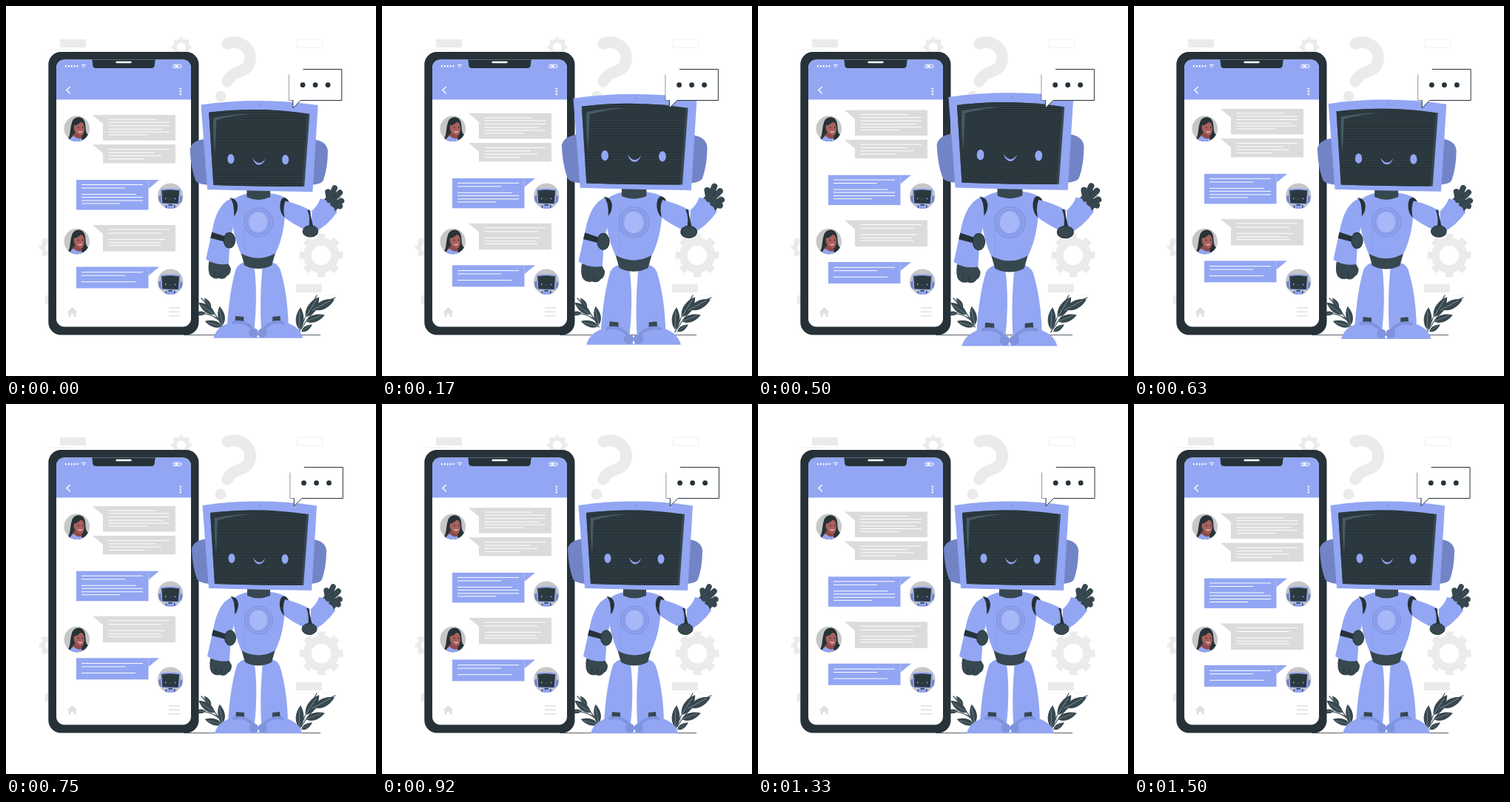
Write an HTML page that moves like this. It is 500x500 px and loops after 1.54 s.

```html
<!DOCTYPE html>
<html lang="en">
<head>
<meta charset="utf-8">
<title>Chat bot</title>
<style>
  html, body { margin: 0; height: 100%; overflow: hidden; background: #fff; }
  svg { display: block; width: 100%; height: 100%; }
  .blue { fill: #92a6f3; }
  .shade { fill: #7284c6; }
  .dark { fill: #263238; }
  .slate { fill: #37474f; }
  .pale { fill: #ebebeb; }
  .line { fill: none; stroke-linecap: round; stroke-linejoin: round; }
</style>
</head>
<body>
<svg viewBox="0 0 500 500">
  <defs>
    <clipPath id="disc"><circle r="17.3"/></clipPath>
    <clipPath id="screen"><rect x="68" y="72.5" width="182" height="361" rx="11"/></clipPath>
    <pattern id="scan" width="4" height="2.6" patternUnits="userSpaceOnUse">
      <rect width="4" height="2.6" fill="#263238"/><rect width="4" height=".8" fill="#35444b"/>
    </pattern>

    <g id="gear" fill="none" stroke="#ebebeb">
      <circle r="18.7" stroke-width="11"/>
      <circle r="26" stroke-width="7" pathLength="16" stroke-dasharray="1 1" stroke-dashoffset=".5"/>
    </g>

    <g id="leaf">
      <path class="slate" d="M0 0C7-6 7-17 1-27C-6-18-6-6 0 0Z"/>
      <path class="line" d="M0 2V-22" stroke="#90a0a6" stroke-width=".6"/>
    </g>

    <g id="girl" clip-path="url(#disc)">
      <circle r="18" fill="#c7c7c7"/>
      <path class="dark" d="M-7-7C-5-18 9-18 11-8C13 0 10 6 18 10V18H-16C-7 12-10 1-7-7Z"/>
      <path d="M-7 10Q0 4-1 0H7V12L0 18Z" fill="#8f4a48"/>
      <path d="M-4-4Q2-5 5-9Q9-9 10-3Q11 6 7 9Q-1 9-4 1Z" fill="#a9605a"/>
      <path class="blue" d="M-10 18Q-9 11-4 10Q1 15 6 13L9 18Z"/>
      <path class="line" d="M2 4Q4 6 7 4" stroke="#fff" stroke-width=".9"/>
      <path class="line" d="M2-2V-1M8-2V-1" stroke="#263238" stroke-width="1.3"/>
    </g>

    <g id="bot">
      <path class="shade" d="M272 182Q253 184 251 196Q252 220 258 236Q260 242 276 243ZM416 183Q432 186 433 198Q433 220 427 237Q425 242 411 243Z"/>
      <!-- legs and feet -->
      <path class="blue" d="M312 353Q317 345 326 345Q336 346 337 360Q340 395 336 432L300 430Q303 382 312 353ZM346 360Q346 346 356 345Q366 345 370 354Q380 386 381 430L345 432Q343 395 346 360Z"/>
      <path class="slate" d="M311 416L322 417V429H310ZM360 417L370 416L371 429H360Z"/>
      <path class="blue" d="M282 445Q286 430 303 425Q322 420 335 432L341 445ZM400 445Q396 430 379 425Q360 420 347 432L341 445Z"/>
      <path class="line" d="M308 425Q322 421 333 432M374 425Q360 421 349 432" stroke="#8093dd" stroke-width="4"/>
      <g fill="#8093dd"><circle cx="335" cy="438" r="6.2"/><circle cx="347" cy="438" r="6.2"/></g>
      <!-- torso -->
      <path class="slate" d="M317 328H365L359 349Q341 358 323 349Z"/>
      <path class="blue" d="M306 264Q318 253 341 253Q366 253 377 260Q378 305 364 333Q341 346 318 333Q304 302 306 264Z"/>
      <path class="slate" d="M326 249H357V259Q341 266 326 259Z"/>
      <path class="line" d="M323 270V331" stroke="#8396e2" stroke-width=".5"/>
      <circle cx="341.500" cy="292" r="19" fill="#8ea1ee" stroke="#7d90dc"/>
      <circle cx="341.500" cy="292" r="15.500" fill="none" stroke="#7d90dc" stroke-width=".8"/>
      <ellipse cx="341" cy="292" rx="12" ry="13.500" fill="#a7b7f7"/>
      <!-- left arm -->
      <path class="dark" d="M304 260Q313 261 314 270Q314 281 307 286Z"/>
      <path class="slate" d="M276 344Q274 358 278 363Q283 368 289 366Q296 369 300 363Q305 361 305 353L300 344Z"/>
      <path class="line" d="M284 358L283 363M291 359V365" stroke="#263238" stroke-width=".8"/>
      <path class="blue" d="M305 261Q286 269 280 305L272 341Q286 350 302 347L304 314Q312 288 308 268Z"/>
      <path d="M280 305L301 312V319L278 313Z" class="dark"/>
      <ellipse class="slate" cx="303" cy="316" rx="7.500" ry="10.200" stroke="#263238"/>
      <!-- right arm -->
      <ellipse class="dark" cx="377" cy="273" rx="7" ry="13.500" transform="rotate(-8 377 273)"/>
      <path class="blue" d="M377 264Q395 268 411 277L407 304Q386 294 376 286Q373 274 377 264Z"/>
      <path class="blue" d="M412 277Q420 270 423 261Q439 263 445 279Q432 298 411 308Z"/>
      <path class="dark" d="M406 276Q411 287 407 302L415 303Q411 287 409 276Z"/>
      <ellipse class="slate" cx="410" cy="304" rx="10" ry="7.500" stroke="#263238"/>
      <path class="line" d="M435 263L433 252M436 260L442 247M439 263L449 253M442 269L451 264M440 268L449 271" stroke="#37474f" stroke-width="7.500"/>
      <path class="slate" d="M428 262Q434 254 443 260L449 270L443 278Q439 265 428 262Z"/>
      <path class="line" d="M440 259L444 253M445 264L450 259" stroke="#202b30" stroke-width=".8"/>
      <!-- head -->
      <path class="blue" d="M265.500 137Q342 126 420 137.500L413 252Q343 251 274 249Z"/>
      <path class="slate" d="M276 147Q342 139 409 149L402 245Q342 245 282 243Z"/>
      <path d="M276 147Q342 139 406 149L399 245Q342 245 282 243Z" fill="url(#scan)"/>
      <path d="M284 202Q281 178 282 154Q307 149 333 149Q308 151 286 157Q285 178 284 202Z" fill="#455a64"/>
      <ellipse class="blue" cx="305" cy="208.500" rx="4.500" ry="6.500"/>
      <ellipse class="blue" cx="377" cy="209.500" rx="4.500" ry="6.500"/>
      <path class="blue" d="M333.500 207Q336 216 342 216.500Q348 216 350.500 208Q347 214 342 214Q337 213 333.500 207Z"/>
      <circle cx="344" cy="137" r="1.200" fill="#8093dd"/>
    </g>

    <g id="botFace" clip-path="url(#disc)">
      <circle r="18" fill="#c7c7c7"/>
      <use href="#bot" transform="scale(.178) translate(-342 -189)"/>
    </g>
  </defs>

  <!-- backdrop -->
  <g class="pale">
    <path d="M73 45H108V56H73ZM53 58.500H90V59.200H53ZM392 376H427V387H392ZM427 390H448V390.600H427ZM53 391H70V402H53ZM402 56H424V56.600H402Z"/>
    <circle cx="290" cy="122" r="7.300"/>
  </g>
  <path d="M393 45H427.500V56H393Z" fill="none" stroke="#ebebeb" stroke-width=".7"/>
  <path class="line" d="M299 51C315 45 330 55 330 71C330 88 314 87 306 93C301 97 301 99 299 102" stroke="#ebebeb" stroke-width="15.500"/>
  <use href="#gear" transform="translate(426 337)"/>
  <use href="#gear" transform="translate(237 55.500) scale(.46)"/>
  <use href="#gear" transform="translate(60 326) scale(.52)"/>
  <path d="M240 444.600H425" stroke="#263238" stroke-width=".8"/>

  <!-- plants -->
  <g class="line" stroke="#37474f" stroke-width="1.200">
    <path d="M293 434Q283 414 264 395M287 424Q277 415 258 415M396 441Q408 410 420 391M399 436Q418 404 445 394"/>
  </g>
  <g id="leaves"></g>

  <!-- phone -->
  <rect class="dark" x="57.300" y="62" width="203.200" height="382.500" rx="17"/>
  <g clip-path="url(#screen)">
    <path d="M68 72H250V434H68Z" fill="#fff"/>
    <path class="blue" d="M68 72H250V126.500H68Z"/>
    <path class="dark" d="M116 70H202V73Q201 74 201 79Q201 84 196 84H122Q117 84 117 79Q117 74 116 73Z"/>
  </g>
  <g class="line" stroke="#fff">
    <path d="M149.500 76H168.500" stroke-width="2.400"/>
    <path d="M81 81.200H97" stroke-width="2.400" stroke-dasharray="0 3.900"/>
    <path d="M102.500 80Q105 78 107.500 80M104 81.700Q105 81 106 81.700M105 83V83" stroke-width="1.100"/>
    <path d="M226.500 79.200H236V83.500H226.500ZM237.300 81V82" stroke-width=".9"/>
    <path d="M228.300 81.300H233" stroke-width="2.500" stroke-linecap="butt"/>
    <path d="M86.500 109.500L81.800 113.700L86.500 118" stroke-width="1.400"/>
    <path d="M235.800 111.800V119.600" stroke-width="2.500" stroke-dasharray="0 3.700"/>
  </g>
  <path d="M82.500 414L89.500 407L96.500 414H94.500V419.500H91.300V415.500H87.700V419.500H84.500V414Z" fill="#e0e0e0"/>
  <path d="M220 408H235M220 413.300H235M220 418.700H235" stroke="#e0e0e0" stroke-width="1.600"/>
  <use href="#girl" transform="translate(95.700 165.700)"/>
  <use href="#girl" transform="translate(95.700 318)"/>
  <use href="#botFace" transform="translate(222.200 256.700)"/>
  <use href="#botFace" transform="translate(222.200 372.700)"/>
  <g id="messages"></g>

  <g id="robot"><use href="#bot"/></g>

  <g id="speech">
    <path d="M382.500 85.500H454V127.500H398.500L388 138V127.500H382.500Z" fill="#fff"/>
    <path class="line" d="M402 85.500H454V127.500H398.500L388 138V127.500" stroke="#263238" stroke-width="1"/>
    <path class="line" d="M388 127.500H382.500V93" stroke="#263238" stroke-width=".5"/>
    <g class="dark"><circle cx="401.200" cy="106.700" r="3.400"/><circle cx="418.200" cy="106.700" r="3.400"/><circle cx="435.200" cy="106.700" r="3.400"/></g>
  </g>
</svg>
<script>
const LOOP = 1540, STEP = 1000 / 24, STEPS = 37;
const byId = id => document.getElementById(id);

// x, y, angle, size
const leaves = [
  [277, 408, -35, .6], [282, 417, -55, 1], [270, 415, -95, .6], [292, 433, -75, .9], [293, 431, -12, .95],
  [396, 437, 2, 1.1], [405, 420, 32, 1.2], [416, 410, 62, 1.15], [405, 426, 70, 1], [399, 440, 55, .65]
];
byId('leaves').innerHTML = leaves.map(([x, y, angle, size]) =>
  `<use href="#leaf" transform="translate(${x} ${y}) rotate(${angle}) scale(${size})"/>`).join('');

// Text lines are [offset from top, right end]
function message(top, height, fromBot, lines) {
  const [x, edge, tip, width] = fromBot ? [95, 192.5, 207, 97.5] : [131, 131, 117, 98];
  const textX = fromBot ? 102 : 138.5;
  return `<g fill="${fromBot ? '#92a6f3' : '#dbdbdb'}">
    <rect x="${x}" y="${top}" width="${width}" height="${height}"/>
    <path d="M${edge} ${top}H${tip}L${edge} ${top + 12}Z"/></g>
    <path stroke="#fff" stroke-width="1" d="${lines.map(([dy, end]) => `M${textX} ${top + dy}H${end}`).join('')}"/>`;
}
byId('messages').innerHTML =
  message(147.7, 34.5, false, [[6, 203], [10, 221], [14.5, 221], [19.2, 212], [23, 221], [27, 191]]) +
  message(187.7, 25.3, false, [[6.5, 221], [11, 201], [15.2, 210], [19.5, 187]]) +
  message(235.5, 40.5, true, [[6.5, 185], [11, 161], [19.5, 176], [23.5, 185], [28, 185], [32, 154]]) +
  message(296.5, 35.5, false, [[6, 221], [11, 210], [19.5, 215], [24, 207], [27.5, 210]]) +
  message(353, 29, true, [[7.3, 185], [11.7, 161], [20.3, 175]]);

// Linear interpolation through [time, value] pairs
function along(points, t) {
  const i = points.findIndex(p => p[0] > t);
  if (i < 0) return points[points.length - 1][1];
  const [[t0, v0], [t1, v1]] = [points[i - 1], points[i]];
  return v0 + (v1 - v0) * (t - t0) / (t1 - t0);
}
const pulse = [[-40, 0], [130, .1], [290, .015], [520, .1], [675, 0]];
const sway = [[0, -.2], [170, .4], [330, -.6], [630, 1.2], [920, 1.4], [1150, 2.1], [1540, -.2]];

function draw(now) {
  const step = Math.floor((now % LOOP + 5) / STEP) % STEPS;
  const t = step * STEP;
  const rise = 10 * (1 - Math.abs(1 - 2 * ((step + 1) % STEPS) / STEPS));
  const scale = 1 + along(pulse, t);
  byId('messages').setAttribute('transform', `translate(0 ${-rise})`);
  byId('robot').setAttribute('transform', `translate(352.5 288) scale(${scale}) translate(-352.5 -288)`);
  byId('speech').setAttribute('transform', `translate(${along(sway, t)} 0)`);
  requestAnimationFrame(draw);
}
draw(performance.now());
</script>
</body>
</html>
```
